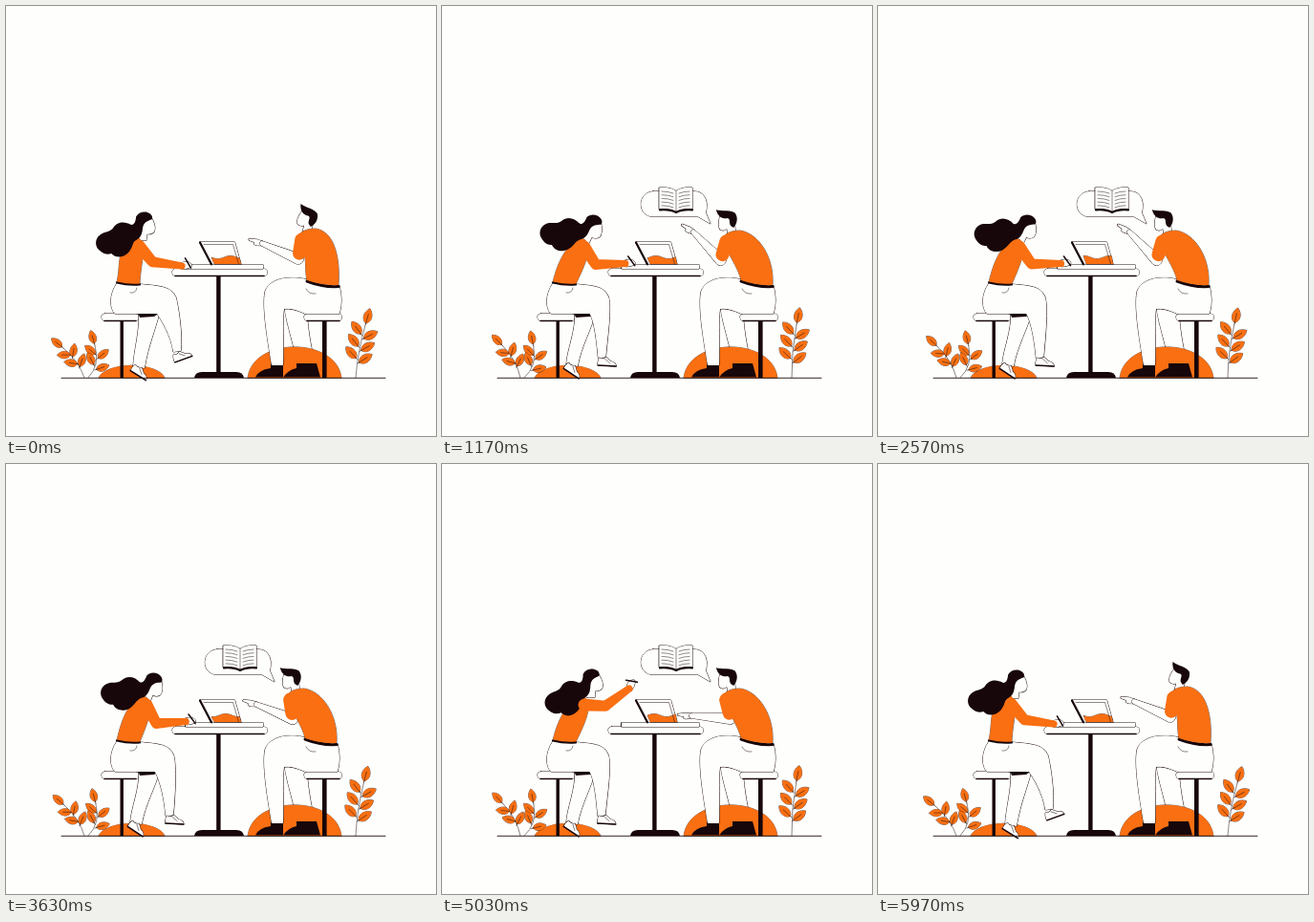
An HTML page for the animation above (6010 ms loop, 450 by 450 pixels).

```html
<!DOCTYPE html>
<html lang="en">
<head>
<meta charset="utf-8">
<title>Table talk</title>
<style>
  html, body { margin: 0; width: 100%; height: 100%; overflow: hidden; background: #fefefd; }
  svg { display: block; width: 100vw; height: 100vh; }
  path, rect { paint-order: stroke; stroke: #20100c; stroke-width: 1; stroke-linejoin: round; stroke-linecap: round; }
  .skin { fill: #fefefd; }
  .orange { fill: #f96f12; stroke-width: .6; }
  .sleeve { fill: #f96f12; stroke: none; }
  .dark { fill: #17060a; stroke: none; }
  .line { fill: none; stroke-width: .5; }
  .thick { fill: none; stroke: #17060a; stroke-width: 2.2; }
  .thin { stroke-width: 1.5; }
  .belt { stroke-width: 3; }
</style>
</head>
<body>
<svg viewBox="0 0 450 450">
  <path class="skin" d="M291 314C294 336 302 355 305 377H324C320 360 316 342 315 320Z"/>
  <path class="orange" d="M97 389A35 15.5 0 0 1 166 389Z"/>
  <path class="orange" d="M253 389C258 346 346 346 351 389Z"/>
  <g id="plants"></g>

  <rect class="dark" x="119.5" y="329" width="3.4" height="60"/>
  <rect class="dark" x="331" y="329" width="4.6" height="60"/>
  <rect class="skin" x="100" y="322" width="39" height="7.5" rx="3.7"/>
  <rect class="skin" x="312" y="322" width="39.5" height="7.5" rx="3.7"/>
  <path class="thick thin" d="M103 329.4H136M315 329.4H349"/>

  <rect class="dark" x="220.2" y="282" width="4.4" height="102"/>
  <path class="dark" d="M197 389Q198 383 205 383H241Q248 383 249 389Z"/>
  <rect class="skin" x="174" y="275" width="99.5" height="7.5" rx="3.7"/>
  <path class="thick thin" d="M177 282.4H270"/>
  <path class="skin" d="M188 270.5H269V275H188Z"/>
  <path class="skin" d="M203 247H239.5L246 270.5H215Z"/>
  <path class="orange" id="wave"/>
  <path class="line" d="M207 249.5H237.5L243.5 270"/>
  <path class="thick" d="M203 247.5L215 270.3"/>

  <g id="girl"></g>
  <g id="man"></g>
  <path class="line" style="stroke-width:.9" d="M58 389.3H397"/>

  <g id="bubble">
    <path class="skin" d="M221 194H264C273 194 277 201 277 208Q277 214 276 216L281 228L268 220.5H221C204 220 204 195 221 194Z"/>
    <path class="skin" d="M227.5 190Q238 189 245 193.5Q252 189 262 190V212.5Q251 211.5 245 215.5Q239 211.5 227.5 212.5Z"/>
    <path class="thick" d="M228 213.3Q239 212.5 245 216Q251 212.5 262 213.3"/>
    <path class="line" id="words"/>
    <path class="line" d="M245 193.5V215"/>
    <path class="skin" id="page"/>
  </g>
</svg>
<script>
const LOOP = 6010;
const $ = id => document.getElementById(id);
const mix = (a, b, u) => a.map((v, i) => v + (b[i] - v) * u);
function ramp(t, from, to) {
  const u = Math.max(0, Math.min(1, (t - from) / (to - from)));
  return u * u * (3 - 2 * u);
}

function node(parent, tag, attrs) {
  const n = document.createElementNS("http://www.w3.org/2000/svg", tag);
  for (const name in attrs) n.setAttribute(name, attrs[name]);
  return parent.appendChild(n);
}
const add = (parent, cls, d = "") => node(parent, "path", { class: cls, d });
const shape = (p, d) => p.setAttribute("d", d);
const place = (p, x, y, a) => p.setAttribute("transform", `translate(${x} ${y}) rotate(${a})`);

// A limb narrowing from radius ra to rb.
function taper([ax, ay], ra, [bx, by], rb) {
  const l = Math.hypot(bx - ax, by - ay) || 1, nx = (ay - by) / l, ny = (bx - ax) / l;
  return `M${bx + nx * rb} ${by + ny * rb}L${ax + nx * ra} ${ay + ny * ra}` +
    `A${ra} ${ra} 0 0 1 ${ax - nx * ra} ${ay - ny * ra}` +
    `L${bx - nx * rb} ${by - ny * rb}A${rb} ${rb} 0 0 1 ${bx + nx * rb} ${by + ny * rb}Z`;
}

// Elbow of a two-bone arm; side picks the bending direction.
function joint([ax, ay], [bx, by], upper, lower, side) {
  const d = Math.min(Math.hypot(bx - ax, by - ay), upper + lower);
  const bend = side * Math.acos((upper * upper + d * d - lower * lower) / (2 * upper * d));
  const a = Math.atan2(by - ay, bx - ax) + bend;
  return [ax + upper * Math.cos(a), ay + upper * Math.sin(a)];
}

// A bent stem with a leaf at its tip and pairs of leaves below it.
function plant(base, bend, tip, pairs, len, swing) {
  const g = node($("plants"), "g", {}), h = len / 2, w = len * .36;
  add(g, "line", `M${base}Q${bend} ${tip}`);
  const leaf = (x, y, a) => {
    const l = node(g, "g", {});
    place(l, x, y, a);
    add(l, "orange", `M2 0C${h * .6} ${-w} ${len * .8} ${-w} ${len + 2} 0C${len * .8} ${w} ${h * .6} ${w} 2 0Z`);
    add(l, "line", `M0 0H${len * .75}`);
  };
  for (let i = 0; i <= pairs; i++) {
    const u = 1 - i * .78 / (pairs + .4);
    const [x, y] = mix(mix(base, bend, u), mix(bend, tip, u), u);
    const p = mix(bend, tip, u), q = mix(base, bend, u);
    const a = Math.atan2(p[1] - q[1], p[0] - q[0]) * 180 / Math.PI;
    if (!i) leaf(x, y, a);
    else for (const side of [-1, 1]) leaf(x, y + side * 2, a + side * 50);
  }
  return sway => g.setAttribute("transform", `rotate(${swing * sway} ${base})`);
}
const plants = [
  plant([82, 389], [76, 371], [60, 358], 2, 14, 7),
  plant([86, 389], [99, 376], [93, 355], 2, 14, 5),
  plant([366, 389], [368, 362], [376, 334], 3, 16, -5.5)
];

let text = "";
for (let i = 0; i < 5; i++) {
  const y = 194 + i * 3.7;
  text += `M230 ${y}Q237 ${y} 242 ${y + 2}M248 ${y + 2}Q253 ${y} 259 ${y}`;
}
shape($("words"), text);

function addShoe(parent) {
  const g = node(parent, "g", {});
  add(g, "skin", "M-8 -4Q-10 1 -9 4H10Q10 0 4 -1Q1 -4 -1 -5Q-4 -2 -8 -4Z");
  add(g, "line", "M-2 -3L3 1");
  add(g, "thick thin", "M-9 4H10");
  return g;
}

const G = $("girl"), g = {};
g.farLeg = add(G, "skin");
g.farShoe = addShoe(G);
add(G, "dark", "M138 321H161L155 325L140 326Z");
g.nearLeg = add(G, "skin");
g.nearShoe = addShoe(G);
add(G, "line", "M137 295Q136 301 130 300");
g.face = add(G, "skin", "M-4 -1L9 -4C10 2 10 8 7 11C4 13 1 12 -1 11L-4 17L-12 14L-8 0Z");
g.torso = add(G, "orange");
add(G, "thick", "M116 289.5Q128 292.5 140 291.5");
g.hair = add(G, "dark", "M9 -8C6 -13 -2 -14 -6 -10C-8 -5 -11 -2 -14 -4C-18 -9 -26 -12 -32 -7C-36 -4 -40 -5 -45 -5C-54 -4 -58 5 -53 12C-50 17 -46 18 -43 18C-40 25 -32 26 -26 23C-20 20 -19 15 -13 13C-7 12 -5 7 -3 3C0 -2 4 -2 9 -2Q11 -5 9 -8Z");
g.hand = add(G, "skin", "M-1 -3Q5 -5 8 -3Q12 0 9 2Q4 4 -1 3Z");
g.pen = add(G, "thick thin", "M-7 0H5");
g.arm = add(G, "sleeve");

const M = $("man"), m = {};
add(M, "dark", "M304 374H325L329 388.5H290Q295 381 304 379Z");
add(M, "dark", "M277 374H290V388.5H261Q264 381 277 379Z");
m.pants = add(M, "skin");
add(M, "line", "M314 296Q317 302 324 301");
m.belt = add(M, "thick belt");
m.face = add(M, "skin", "M-7 -4C-9 2 -9 7 -7 10Q-3 12 0 9L1 15L9 13L8 0Z");
m.hair = add(M, "dark", "M-11 -11C-6 -9 6 -11 9 -7C12 -2 11 4 7 8L4 6C2 2 4 -1 1 -2C-4 -1 -9 -3 -11 -11Z");
m.hand = add(M, "skin", "M0 2.3L6 2.5L14 1Q15.5 0 14 -.8L8 -1.2Q9 -4 5 -3.5L0 -2.3Z");
m.forearm = add(M, "skin");
m.torso = add(M, "orange");
m.sleeve = add(M, "sleeve");

// lean: 0 at rest, 1 while talking.
function drawGirl(t, lean, sway) {
  const reach = ramp(t, 3700, 4430), lift = ramp(t, 4430, 5030);
  const head = mix([145, 228, -19], mix([152 + 6 * sway, 231, 4 * sway - 5], [157, 227, -23], lift), lean);
  const [sx, sy] = mix([139, 243], [146 + 3 * sway, 244], lean);
  const [nx, ny, na] = mix([184, 366, -20], [178 - 6 * sway, 372.5, 3], lean);
  const [fx, fy, fa] = mix([140, 383, 32], [137, 381, 34], lean);

  // Wrist x, y, hand angle, pen angle.
  const write = [187 + 6 * sway + Math.sin(t / 65), 269.5, -3, 54];
  const raised = mix([195, 253, -20, 20], [196, 235, -60, 10], lift);
  const [wx, wy, turn, tilt] = mix([184, 272, -5, 60], mix(write, raised, reach), lean);

  const kx = 178 + (nx - 184) * .3;
  shape(g.farLeg, `M139 322C140 340 ${fx - 6} 360 ${fx - 7} ${fy - 6}L${fx + 5} ${fy - 4}C${fx + 9} 355 156 340 161 320Z`);
  place(g.farShoe, fx, fy, fa);
  shape(g.nearLeg, `M116 290C108 302 108 316 114 322H${kx - 20}C${kx - 16} 328 ${nx - 11} 345 ${nx - 9} ${ny - 4}` +
    `L${nx - 1} ${ny - 5}C${nx + 1} 345 ${kx + 3} 318 ${kx} 305C${kx - 5} 293 160 293 140 291Z`);
  place(g.nearShoe, nx, ny, na);

  place(g.face, ...head);
  place(g.hair, ...head);
  shape(g.torso, `M116 289C120 272 ${sx - 23} ${sy + 15} ${sx - 12} ${sy + 3}Q${sx - 6} ${sy - 2} ${sx} ${sy}` +
    `C${sx + 9} ${sy + 8} ${sx + 2} ${sy + 25} 140 291Q128 292 116 289Z`);

  const top = [sx, sy + 8], wrist = [wx, wy], elbow = joint(top, wrist, 22, 31, 1);
  shape(g.arm, taper(top, 6.5, elbow, 5.5) + taper(elbow, 5.5, wrist, 3.6));
  place(g.hand, wx, wy, turn);
  const a = turn * Math.PI / 180;
  place(g.pen, wx + 7 * Math.cos(a), wy + 7 * Math.sin(a) - 1.5, tilt);
}

function drawMan(t, lean) {
  const head = mix([315, 221, 20], [298, 224, -1], lean);
  const [sx, sy] = mix([314, 235], [302, 237], lean);
  const point = mix([263, 236.5, 212], [261, 263.5, 184], ramp(t, 2700, 4430));
  const [wx, wy, turn] = mix([268, 248.5, 197], point, lean);
  const dx = 2 * (1 - lean);

  shape(m.pants, `M${313 + dx} 286C295 282 276 285 271 299C268 315 273 345 278 376H290C291 350 289 332 291 317` +
    `Q300 316 313 322H${347 + dx}Q${351 + dx} 308 ${347 + dx} 293Z`);
  shape(m.belt, `M${313 + dx} 288Q${330 + dx} 294.5 ${346 + dx} 293.5`);
  place(m.face, ...head);
  place(m.hair, ...head);
  shape(m.torso, `M${sx - 5} ${sy + 2}Q${sx} ${sy - 2} ${sx + 10} ${sy - 2}C${sx + 30} ${sy + 1} ${348 + dx} 264 ${346 + dx} 292` +
    `Q${330 + dx} 293 ${313 + dx} 287C${310 + dx} 275 ${sx + 2} ${sy + 30} ${sx - 5} ${sy + 16}Z`);

  const top = [sx - 4, sy + 10], wrist = [wx, wy], elbow = joint(top, wrist, 20, 41, -1);
  place(m.hand, wx, wy, turn);
  shape(m.forearm, taper(elbow, 5.6, wrist, 2.4));
  shape(m.sleeve, taper(top, 7.8, mix(top, elbow, .7), 7));
}

function drawBubble(t) {
  const s = ramp(t, 250, 600) * (1 - ramp(t, 5250, 5600));
  $("bubble").setAttribute("transform", `translate(278 226) scale(${s}) translate(-278 -226)`);
  $("bubble").style.display = s ? "" : "none";
  const turn = ((t - 700) % 1060) / 460, flipping = t > 700 && t < 4400 && turn < 1;
  $("page").style.display = flipping ? "" : "none";
  if (!flipping) return;
  const a = Math.PI * ramp(turn, 0, 1), c = Math.cos(a), x = 245 + 17 * c, cx = 245 + 7 * c;
  const y = 190.5 - 11 * Math.sin(a);
  shape($("page"), `M245 193.5Q${cx} ${y + 1} ${x} ${y}V${y + 22}Q${cx} ${y + 22} 245 215.5Z`);
}

function drawWave(angle) {
  let d = "M218 270";
  for (let i = 0; i <= 14; i++) d += `L${215 + i * 2.1} ${263 + 1.6 * Math.sin(i * .5 - angle)}`;
  shape($("wave"), d + "L246 270Z");
}

function draw(t) {
  const angle = t / LOOP * Math.PI * 6, sway = (1 - Math.cos(angle)) / 2;
  const lean = ramp(t, 0, 1000) * (1 - ramp(t, 5030, 5970));
  drawGirl(t, lean, sway);
  drawMan(t, lean);
  drawBubble(t);
  drawWave(angle);
  plants.forEach(swing => swing(sway));
}

const begin = performance.now();
function tick() {
  draw((performance.now() - begin) % LOOP);
  requestAnimationFrame(tick);
}
tick();
</script>
</body>
</html>
```
